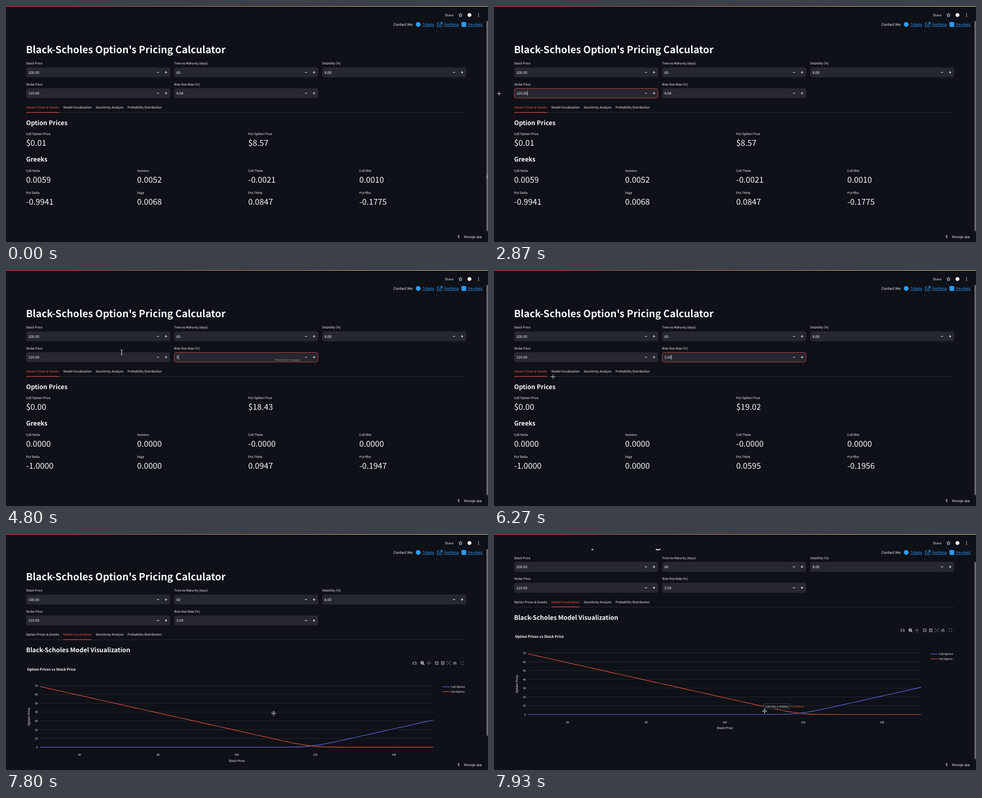
Recreate the animation shown at these times as an HTML page. Size 1067 by 525 pixels, loop 8 s.

```html
<!DOCTYPE html>
<html lang="en">
<head>
<meta charset="utf-8">
<title>Option pricing calculator</title>
<style>
html, body { margin: 0; height: 100%; overflow: hidden; background: #0e1117; }
svg { display: block; width: 1067px; height: 525px; }
text {
  font-family: "Noto Sans CJK JP", "Noto Sans CJK SC", "Noto Sans CJK", "Open Sans", sans-serif;
  text-rendering: geometricPrecision; white-space: pre;
}
</style>
</head>
<body>
<svg id="stage" viewBox="0 0 1067 525"></svg>
<script>
const stage = document.getElementById('stage');
const LOOP = 8000, STEP = 200 / 3;
const WHITE = '#fafafa', RED = '#ff4b4b', BLUE = '#2e9aff', CALL = '#636efa', PUT = '#ef553b';
const COLS3 = [44.45, 372.2, 700], COLS4 = [44.45, 290.3, 536.2, 782.1];
const SMALL = 6.67, LABEL = 7.78, BODY = 8.89, HEAD = 15.56, METRIC = 20, TITLE = 24.45;

const clamp = (v, a = 0, b = 1) => Math.min(b, Math.max(a, v));
const mix = (a, b, k) => a + (b - a) * k;
const ramp = (t, start, length) => clamp((t - start) / length);

// The CJK face draws its Latin letters larger than the nominal size.
const text = (x, y, size, s, more = '') =>
  `<text x="${x}" y="${y}" font-size="${(size * 0.895).toFixed(3)}" fill="${WHITE}" ${more}>${s.replace('&', '&amp;')}</text>`;
const rect = (x, y, w, h, fill, more = '') =>
  `<rect x="${x}" y="${y}" width="${w}" height="${h}" fill="${fill}" ${more}/>`;
const line = (d, color, width = 1, more = '') =>
  `<path d="${d}" fill="none" stroke="${color}" stroke-width="${width}" ${more}/>`;
const at = (x, y, body) => `<g transform="translate(${x} ${y})">${body}</g>`;
const tint = color => `style="fill:${color}"`;
const bold = 'font-weight="700"', semi = 'font-weight="600"';

// ---- header and footer ----
const star = Array.from({ length: 10 }, (_, i) => {
  const r = i % 2 ? 1.9 : 4.3, a = Math.PI * (i / 5 - 0.5);
  return (r * Math.cos(a)).toFixed(2) + ' ' + (r * Math.sin(a)).toFixed(2);
}).join('L');

const link = (x, s) => text(x, 44, BODY, ' ' + s, tint(BLUE) + ' text-decoration="underline"');

const header = rect(0, 0, 1067, 33.3, '#0e1117') +
  '<linearGradient id="bar"><stop stop-color="#ff4b4b"/><stop offset="1" stop-color="#fffd80"/></linearGradient>' +
  rect(0, 0, 1067, 1.1, 'url(#bar)') +
  text(971.5, 22.8, LABEL, 'Share') +
  at(1006, 20.3, line(`M${star}Z`, WHITE, 0.9)) +
  `<circle cx="1026" cy="20" r="4.3" fill="${WHITE}"/>` +
  [16.8, 20, 23.2].map(y => `<circle cx="1046" cy="${y}" r=".9" fill="${WHITE}"/>`).join('') +
  text(857.5, 44, BODY, 'Contact Me:') +
  `<circle cx="912.5" cy="41" r="5.4" fill="${BLUE}"/>` + link(920.2, 'Tubelo') +
  line('M959 37.5H955V46H963.5V42M961 36.2H965.6V41M965.4 36.4L958.5 43.3', BLUE, 1.2) + link(968.2, 'Portfolio') +
  rect(1008.2, 35.8, 10.8, 10.8, BLUE, 'rx="1.5"') + link(1021.4, 'Fendakil');

const footer = line('M1003.4 510L1000.4 513L1003.4 516', WHITE, 1.1) + text(1014, 515.6, LABEL, 'Manage app');

// ---- inputs ----
const width = s => [...s].reduce((w, c) => w + (c === '.' ? 2.21 : 4.42), 0);

// focus: border strength, pick: x where the selection begins
function field(col, y, label, value, { focus = 0, pick, caret, hint } = {}) {
  const x = COLS3[col], mid = y + 11.1, left = x + 5, end = left + width(value);
  let out = text(x, y - 6.3, LABEL, label) + rect(x, y, 318.9, 22.2, '#262730', 'rx="4.4"');
  if (focus) out += `<rect x="${x + 0.3}" y="${y + 0.3}" width="318.3" height="21.6" rx="4.2" fill="none" stroke="${RED}" stroke-width=".8" opacity="${focus}"/>`;
  if (pick !== undefined) {
    const from = clamp(pick, left, end);
    out += rect(from, mid - 5.7, end - from, 11.6, '#1c4fb4');
  }
  out += text(left, mid + 3, BODY, value);
  if (caret) out += rect(end, mid - 5.6, 0.7, 11.2, WHITE);
  if (hint) out += text(x + 277.8, y + 19.4, SMALL, 'Press Enter to apply', tint('#a0a2a8') + ' text-anchor="end"');
  return out + line(`M${x + 289.3} ${mid}h5M${x + 307.2} ${mid}h5m-2.5 -2.5v5`, WHITE, 1.2);
}

function strikeField(t) {
  const value = t < 2000 ? '110.00' : t < 2060 ? '1' : t < 2130 ? '12' : t < 2600 ? '120' : '120.00';
  return field(0, 182.9, 'Strike Price', value, {
    focus: ramp(t, 930, 140) * (1 - ramp(t, 3530, 200)),
    pick: t >= 1000 && t < 2000 ? cursorAt(t)[0] : undefined,
    caret: t >= 2000 && t < 3530,
    hint: t >= 2000 && t < 2600
  });
}

function rateField(t) {
  const value = t < 4800 ? '8.00' : t < 5270 ? '5' : '5.00';
  return field(1, 182.9, 'Risk-free Rate (%)', value, {
    focus: ramp(t, 3600, 200) * (1 - ramp(t, 6930, 200)),
    pick: t > 3740 && t < 4800 ? cursorAt(t)[0] + 70 : undefined,
    caret: (t >= 3600 && t < 3740) || (t >= 4800 && t < 6530),
    hint: t >= 4800 && t < 5270
  });
}

// ---- tabs ----
const TABS = [[44.45, 118, 'Option Prices & Greeks'], [127, 189.7, 'Model Visualization'],
  [198.5, 260.5, 'Sensitivity Analysis'], [269, 345, 'Probability Distribution']];

function tabs(t) {
  const active = t < 6930 ? 0 : 1, k = ramp(t, 6870, 200);
  const x1 = mix(TABS[0][0], TABS[1][0], k), x2 = mix(TABS[0][1], TABS[1][1], k);
  return TABS.map(([x, , s], i) => text(x, 228.1, LABEL, s, i === active ? tint(RED) : '')).join('') +
    rect(44.45, 236.4, 974.5, 0.7, '#383b43') + rect(x1, 236, x2 - x1, 1.2, RED);
}

// ---- first panel ----
const NAMES = ['Call Delta', 'Gamma', 'Call Theta', 'Call Rho', 'Put Delta', 'Vega', 'Put Theta', 'Put Rho'];
const RESULTS = [
  '$0.01 $8.57 0.0059 0.0052 -0.0021 0.0010 -0.9941 0.0068 0.0847 -0.1775',
  '$0.00 $18.43 0.0000 0.0000 -0.0000 0.0000 -1.0000 0.0000 0.0947 -0.1947',
  '$0.00 $19.02 0.0000 0.0000 -0.0000 0.0000 -1.0000 0.0000 0.0595 -0.1956'
].map(s => s.split(' '));

const metric = (x, y, name, value) => text(x, y, LABEL, name) + text(x, y + 23.6, METRIC, value);

function pricesPanel(t) {
  const [call, put, ...greeks] = RESULTS[t < 3060 ? 0 : t < 5600 ? 1 : 2];
  return text(44.45, 265.1, HEAD, 'Option Prices', semi) +
    metric(COLS4[0], 287.4, 'Call Option Price', call) + metric(COLS4[2], 287.4, 'Put Option Price', put) +
    text(44.45, 346.3, HEAD, 'Greeks', semi) +
    NAMES.map((n, i) => metric(COLS4[i % 4], i < 4 ? 369 : 418.4, n, greeks[i])).join('');
}

// ---- chart panel ----
const px = s => 75.8 + (s - 50) * 8.698, py = v => 474.3 - v * 1.9543;

function cdf(z) {
  const k = 1 / (1 + 0.2316419 * Math.abs(z));
  const tail = Math.exp(-z * z / 2) / Math.sqrt(2 * Math.PI) *
    k * (0.31938153 + k * (-0.356563782 + k * (1.781477937 + k * (-1.821255978 + k * 1.330274429))));
  return z > 0 ? 1 - tail : tail;
}

function callPrice(s, strike = 120, rate = 0.05, vol = 0.08, years = 60 / 365) {
  const dev = vol * Math.sqrt(years);
  const d = (Math.log(s / strike) + (rate + vol * vol / 2) * years) / dev;
  return s * cdf(d) - strike * Math.exp(-rate * years) * cdf(d - dev);
}
const putPrice = s => callPrice(s) - s + 120 * Math.exp(-0.05 * 60 / 365);

const curve = (f, color) => line('M' + Array.from({ length: 100 }, (_, i) => {
  const s = 50 + i * 100 / 99;
  return px(s).toFixed(2) + ' ' + py(f(s)).toFixed(2);
}).join('L'), color, 1.2);

const GREY = '#686a6f';
const modebar =
  at(904.5, 287, `<path d="M-4.5 -2.5h2.5l1 -1.5h2l1 1.5h2.5v6h-9zM0 -1.5a2 2 0 1 0 .01 0z" fill="${GREY}" fill-rule="evenodd"/>`) +
  at(922, 287, line('M2.3 -.6a3 3 0 1 1 -6 0a3 3 0 1 1 6 0M1.4 1.6L4.2 4.2M-2.2 -.6h3M-.7 -2.1v3', '#d2d3d5', 1.3)) +
  at(936, 287, line('M-4 0H4M0 -4V4', GREY, 1.1) +
    `<path d="M0 -4.8l1.7 2h-3.4zM0 4.8l1.7 -2h-3.4zM-4.8 0l2 -1.7v3.4zM4.8 0l-2 -1.7v3.4z" fill="${GREY}"/>`) +
  at(953.5, 287, rect(-4, -4, 8, 8, GREY) + line('M-2.5 0h5M0 -2.5v5', '#0e1117', 1.2)) +
  at(967, 287, rect(-4, -4, 8, 8, GREY) + line('M-2.5 0h5', '#0e1117', 1.2)) +
  at(980.3, 287, line('M-4 -2V-4H-2M2 -4H4V-2M4 2V4H2M-2 4H-4V2M-3 -3L3 3M3 -3L-3 3', GREY, 1)) +
  at(993.7, 287, `<path d="M-4.8 .4L0 -4L4.8 .4H3.4V4H1V1.2H-1V4H-3.4V.4z" fill="${GREY}"/>`) +
  at(1010.3, 287, line('M-3.3 -1.2V-3.3H-1.2M1.2 -3.3H3.3V-1.2M3.3 1.2V3.3H1.2M-1.2 3.3H-3.3V1.2', GREY, 1.1));

const legend = (y, color, s) => line(`M966 ${y}H982.3`, color, 1.2) + text(985, y + 2.3, SMALL, s);

const chart = text(46.5, 304, BODY, 'Option Prices vs Stock Price', bold) +
  [0, 10, 20, 30, 40, 50, 60, 70].map(v =>
    line(`M75.8 ${py(v)}H945.6`, '#2a2d34', 0.9) +
    text(70.7, py(v) + 2.3, SMALL, '' + v, 'text-anchor="end"')).join('') +
  [60, 80, 100, 120, 140].map(s => text(px(s), 493.4, SMALL, '' + s, 'text-anchor="middle"')).join('') +
  text(510.7, 506.8, LABEL, 'Stock Price', 'text-anchor="middle"') +
  at(52.6, 406.5, text(0, 0, LABEL, 'Option Price', 'text-anchor="middle" transform="rotate(-90)"')) +
  curve(callPrice, CALL) + curve(putPrice, PUT) +
  legend(339.9, CALL, 'Call Option') + legend(350.6, PUT, 'Put Option');

const tip = rect(597.5, 450.3, 57.5, 11.2, '#0e1117', 'stroke="#55585f" stroke-width=".7"') +
  text(599.8, 458.5, SMALL, '(109.596, 9.428281)') + text(656.6, 458.5, SMALL, 'Put Option', tint(PUT));

const chartPanel = t => text(44.45, 265.1, HEAD, 'Black-Scholes Model Visualization', semi) +
  (t < 7130 ? '' : at(0, 1.6, chart + (t > 7390 ? modebar : '') + (t > 7920 ? tip : '')));

// ---- pointer: time, x, y ----
const PATH = [[0, 1066, 380], [70, 1066, 380], [330, 620, 190], [530, 230, 103], [670, 27, 150], [870, 92, 195],
  [1000, 92, 195], [1400, 11.3, 194.8], [2870, 11.3, 194.8], [3270, 520, 213], [3530, 520, 213], [3670, 551.5, 194],
  [3733, 551.5, 194], [4000, 256, 183], [5400, 256, 183], [5800, 148, 220], [6067, 164, 245], [6130, 160, 244],
  [6266, 130.8, 237.3], [6530, 130.8, 237.3], [6730, 150, 227], [7060, 150, 227], [7733, 592.5, 399],
  [7800, 592.5, 399], [7933, 599, 394], [8000, 599, 394]];

function cursorAt(t) {
  const i = Math.max(1, PATH.findIndex(p => p[0] >= t));
  const [a, x, y] = PATH[i - 1], [b, u, v] = PATH[i];
  const k = ramp(t, a, b - a), e = k * k * (3 - 2 * k);
  return [mix(x, u, e), mix(y, v, e)];
}

function cursor(t) {
  const [x, y] = cursorAt(t);
  const inField = COLS3.some((c, i) => x > c && x < c + 319 &&
    ((y > 136 && y < 159) || (i < 2 && y > 182.8 && y < 205)));
  const plus = 'M-5 0H5M0 -5V5';
  if (x > 1060) return at(x, y, line('M-4 0H4M-1 -5V5M1 -5V5', '#b5b6b8', 0.7));
  if (inField) return at(x, y, line('M-2.5 -5H-.7L0 -4.5L.7 -5H2.5M-2.5 5H-.7L0 4.5L.7 5H2.5M0 -4.5V4.5', '#d8d8da', 1.2));
  if (t > 7130 && y > 320) return at(x, y, line(plus, '#d0d1d3', 2.2) + line('M-4 0H4M0 -4V4', '#33363c', 0.7));
  return at(x, y, line(plus, WHITE, 0.9));
}

// ---- scene ----
function draw(t) {
  const scroll = t < 7790 ? 0 : t < 7860 ? 1.6 : t < 7930 ? 36 : 74.4;
  const k = scroll / 74.4, top = 33.3 + 29.2 * k;
  const bottom = t < 7130 ? 500.5 : 447.5 + 53 * k;
  stage.innerHTML =
    at(0, -scroll,
      text(44.2, 105.1, TITLE, "Black-Scholes Option's Pricing Calculator", bold) +
      field(0, 136.4, 'Stock Price', '100.00') +
      field(1, 136.4, 'Time to Maturity (days)', '60') +
      field(2, 136.4, 'Volatility (%)', '8.00') +
      strikeField(t) + rateField(t) + tabs(t) +
      (t < 6930 ? pricesPanel(t) : chartPanel(t))) +
    header + footer +
    rect(1063.6, top, 3.4, bottom - top, '#6b6c70') +
    cursor(t);
}

const start = performance.now();
let shown = -1;
function tick() {
  const n = Math.floor((performance.now() - start + 5) % LOOP / STEP);
  if (n !== shown) draw((shown = n) * STEP);
  requestAnimationFrame(tick);
}
tick();
</script>
</body>
</html>
```
